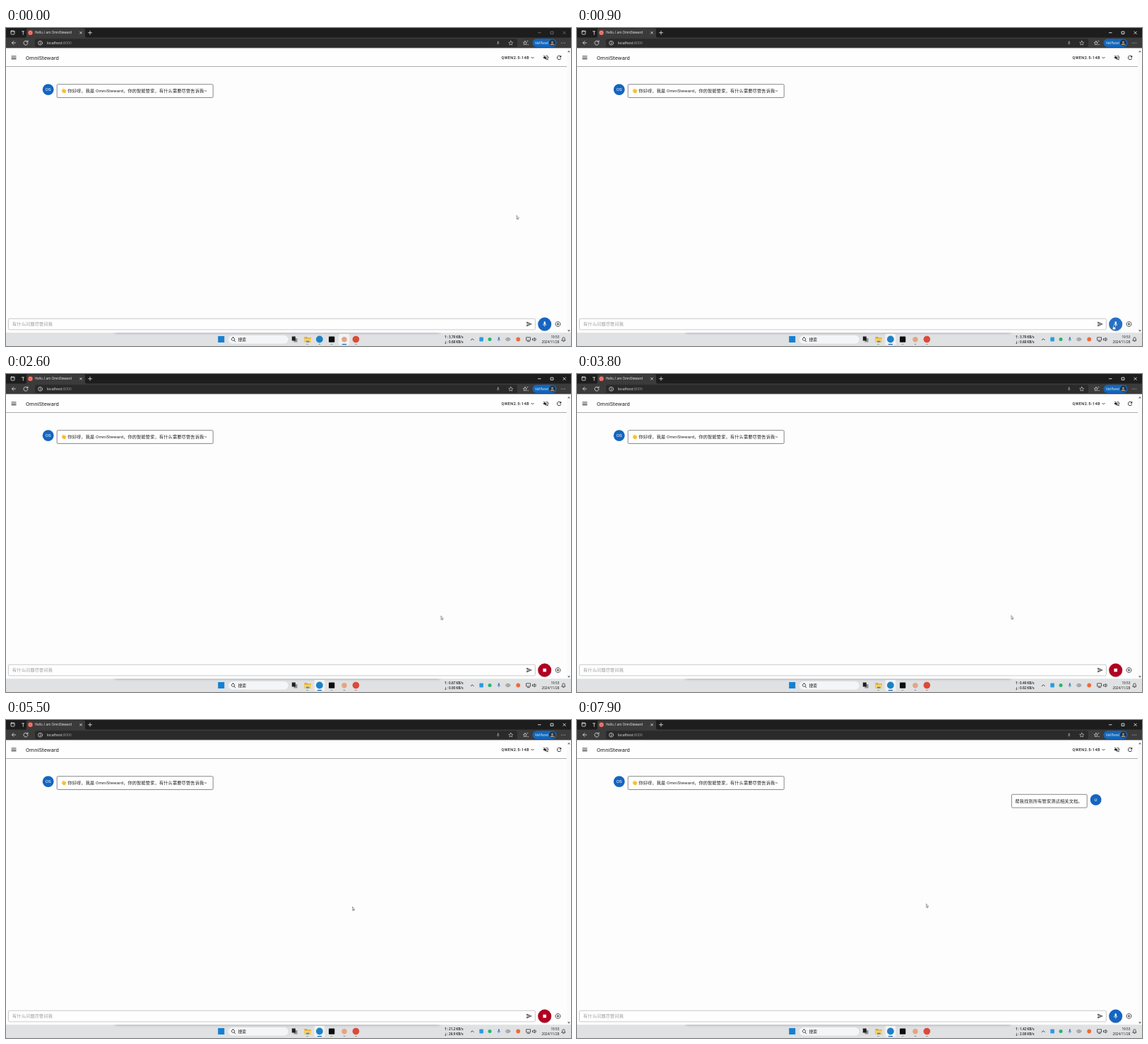
Animation, 800 px wide and 450 px high, one loop 8 s. Source, as an HTML page:

```html
<!DOCTYPE html>
<html lang="zh">
<head>
<meta charset="utf-8">
<title>OmniSteward</title>
<style>
html, body { margin: 0; width: 100%; height: 100%; overflow: hidden; background: #fdfdfd; }
svg { display: block; }
#stage { width: 100vw; height: 100vh; }
text { white-space: pre; }
.chrome { font-family: "Open Sans", "Noto Sans", sans-serif; fill: #f2f2f2; }
.app { font-family: Roboto, "Noto Sans CJK SC", "Noto Sans CJK", sans-serif; fill: #1c1c1c; }
.chat { font-size: 6.16px; letter-spacing: .19px; }
.sys { font-family: "Open Sans", "Noto Sans CJK SC", "Noto Sans CJK", sans-serif; fill: #161616; font-size: 4.7px; }
.line { fill: none; stroke: currentColor; stroke-width: .8; stroke-linecap: round; stroke-linejoin: round; }
.bubble { fill: #fefefe; stroke: #6c6c6c; stroke-width: .8; }
.mid { text-anchor: middle; }

/* one 8 s clock for everything */
.idle, .live, .net, .reply, .face, .wait, .mic, .stop, .cursor, .arrow, .hand {
  animation: 8s step-end infinite;
}
.idle { animation-name: idle; }
.live { animation-name: live; }
.net { animation-name: net; }
.reply { animation-name: reply; }
.mic { animation-name: mic; }
.stop { animation-name: stop; }
.arrow { animation-name: arrow; }
.hand { animation-name: hand; }
.face { animation-name: face; animation-timing-function: linear; }
.wait { animation-name: wait; animation-timing-function: linear; }
.cursor { animation-name: move; animation-timing-function: linear; }

@keyframes idle { 0% { visibility: visible } 10%, 100% { visibility: hidden } }
@keyframes live { 0% { visibility: hidden } 10%, 100% { visibility: visible } }
@keyframes reply { 0% { visibility: hidden } 98.2%, 100% { visibility: visible } }
@keyframes mic {
  0% { visibility: visible } 22.5% { visibility: hidden } 81.25%, 100% { visibility: visible }
}
@keyframes stop {
  0% { visibility: hidden } 22.5% { visibility: visible } 81.25%, 100% { visibility: hidden }
}
@keyframes arrow {
  0% { visibility: visible } 9% { visibility: hidden } 26.2%, 100% { visibility: visible }
}
@keyframes hand {
  0% { visibility: hidden } 9% { visibility: visible } 26.2%, 100% { visibility: hidden }
}
@keyframes face {
  0%, 8.75% { fill: #1565c0 }
  10%, 22% { fill: #2470c6 }
  23.2%, 24.2% { fill: #7898b8 }
  27%, 84% { fill: #b00020 }
  88.75%, 100% { fill: #1565c0 }
}
@keyframes wait {
  0%, 22% { opacity: 0 }
  23.2%, 24.2% { opacity: 1 }
  27%, 100% { opacity: 0 }
}
@keyframes net {
  0% { transform: translateY(0) }
  12.5% { transform: translateY(-20px) }
  37.5% { transform: translateY(-40px) }
  68% { transform: translateY(-60px) }
  82% { transform: translateY(-80px) }
  98.2%, 100% { transform: translateY(-100px) }
}
@keyframes move {
  0%, 1.25% { transform: translate(722.5px, 265px); animation-timing-function: ease-in-out }
  10%, 25% { transform: translate(758.8px, 420px); animation-timing-function: ease-in-out }
  33%, 58% { transform: translate(614.4px, 341.5px); animation-timing-function: ease-in-out }
  67.5%, 69% { transform: translate(490px, 264px) }
  71.25%, 73% { transform: translate(493.4px, 260.2px) }
  76.25%, 100% { transform: translate(494px, 259.8px) }
}
</style>
</head>
<body>
<svg id="stage" viewBox="0 0 800 450" preserveAspectRatio="none" xmlns="http://www.w3.org/2000/svg">
<defs>
  <symbol id="i-menu" viewBox="0 0 24 24"><path d="M3 18h18v-2H3zm0-5h18v-2H3zm0-7v2h18V6z"/></symbol>
  <symbol id="i-mic" viewBox="0 0 24 24"><path d="M12 14a3 3 0 0 0 3-3V5a3 3 0 0 0-6 0v6a3 3 0 0 0 3 3zm5.3-3a5.3 5.3 0 0 1-10.6 0H5a7 7 0 0 0 6 6.7V21h2v-3.3a7 7 0 0 0 6-6.7z"/></symbol>
  <symbol id="i-send" viewBox="0 0 24 24"><path d="M2 21 23 12 2 3v7l15 2-15 2z"/></symbol>
  <symbol id="i-reload" viewBox="0 0 24 24"><path d="M17.65 6.35A8 8 0 1 0 19.73 14h-2.08A6 6 0 1 1 12 6c1.66 0 3.14.69 4.22 1.78L13 11h7V4z"/></symbol>
  <symbol id="i-mute" viewBox="0 0 24 24"><path d="M16.5 12A4.5 4.5 0 0 0 14 8v2.2l2.45 2.45zM19 12c0 .94-.2 1.82-.54 2.64l1.51 1.51A9 9 0 0 0 14 3.23v2.06A7 7 0 0 1 19 12zM4.27 3 3 4.27 7.73 9H3v6h4l5 5v-6.73l4.25 4.25A7 7 0 0 1 14 18.7v2.06a9 9 0 0 0 3.69-1.81L19.73 21 21 19.73zM12 4 9.9 6.1 12 8.2z"/></symbol>
  <symbol id="i-plus" viewBox="0 0 24 24"><path fill="none" stroke="currentColor" stroke-width="2" d="M12 7v10M7 12h10M12 3a9 9 0 1 0 .01 0z"/></symbol>
  <linearGradient id="shade" x2="0" y2="1"><stop stop-color="#bcbfc2"/><stop offset="1" stop-color="#dfe1e3" stop-opacity="0"/></linearGradient>
  <filter id="soft" x="-5%" y="-50%" width="110%" height="200%"><feGaussianBlur stdDeviation="2 .6"/></filter>
</defs>

<!-- browser -->
<g class="chrome">
  <rect width="800" height="29" fill="#1d1d1d"/>
  <path d="M0 13.5h27q2 0 2-2V2.500q0-2 2-2h79q2 0 2 2v9q0 2 2 2h686V28.600H0z" fill="#3b3b3b"/>
  <g color="#e6e6e6" class="line">
    <rect x="7" y="4" width="5" height="5" rx=".8"/>
    <path d="M7 5h5M22.500 4.800h3M24.300 4.800v4.500"/>
    <path d="M104.600 5.300l2.800 2.800m0-2.800-2.800 2.800M116.500 6.700h5M119 4.200v5"/>
    <path d="M13.500 21H8.500m2.300-2.400L8.400 21l2.400 2.400"/>
    <path d="M30.600 19.600a3 3 0 1 0 .4 1.800M31 17.800v2h-2"/>
  </g>
  <circle cx="34.500" cy="6.700" r="3.400" fill="#e05a52"/>
  <circle cx="34.500" cy="6.700" r="1.900" fill="#f3d6d3"/>
  <circle cx="34.500" cy="6.700" r="1.200" fill="#c8322c"/>
  <text x="41" y="8.400" font-size="4.500">Hello, I am OmniSteward</text>
  <rect x="41" y="15.300" width="683" height="11.800" rx="2.500" fill="#2a2a2a"/>
  <g color="#d8d8d8" class="line">
    <circle cx="48.500" cy="21.200" r="2.900"/>
    <path d="M48.500 21v1.500M48.500 19.700v.05"/>
    <path d="M714.800 18.200l.9 1.900 2.100.3-1.500 1.500.3 2.100-1.800-1-1.900 1 .4-2.100-1.600-1.500 2.200-.3z" stroke-width=".6"/>
    <path d="M735 18.500l.8 1.700 1.900.3-1.400 1.300.3 1.900-1.600-.9-1.700.9.300-1.900-1.400-1.300 1.900-.3zM737.800 18.500h1.200M738.500 23.500h1" stroke-width=".7"/>
  </g>
  <use href="#i-mic" x="693.500" y="18" width="6.400" height="6.400" fill="#9a9a9a"/>
  <text x="57.800" y="23" font-size="5.200">localhost<tspan fill="#9c9c9c">:8000</tspan></text>
  <rect x="745.500" y="15.300" width="34" height="11.600" rx="5.800" fill="#1267bd"/>
  <text x="749" y="22.800" font-size="4.500">VeilPanel</text>
  <circle cx="773.500" cy="21.100" r="4.500" fill="#24303c"/>
  <path d="M770.500 24.300q.2-2.600 3-2.600t3 2.600z" fill="#9c8c80"/>
  <circle cx="773.500" cy="20" r="1.600" fill="#9c8c80"/>
  <path d="M786.600 21.200h.1M789 21.200h.1M791.400 21.200h.1" class="line" color="#e6e6e6" stroke-width="1.100"/>
  <g class="line" stroke-width=".6">
    <path class="idle" color="#777" d="M753.500 6.700h3.600M771.500 5h3.400v3.400h-3.400zM788.900 5l3.400 3.400m0-3.400-3.400 3.400"/>
    <path class="live" color="#fff" d="M753.500 6.700h3.600M771.500 5h3.400v3.400h-3.400zM788.900 5l3.400 3.400m0-3.400-3.400 3.400"/>
  </g>
</g>

<!-- page -->
<rect y="28.600" width="800" height="402.600" fill="#fdfdfd"/>
<rect y="28.600" width="794" height="25.600" fill="#fefefe"/>
<rect y="54.100" width="794" height=".8" fill="#989898"/>
<rect x="794" y="28.600" width="6" height="402.600" fill="#fafafa"/>
<path d="M795 34.300l2-2.600 2 2.600zM795 427.300l2 2.600 2-2.600z" fill="#777"/>
<g class="app">
  <use href="#i-menu" x="6.400" y="37.200" width="9.240" height="9.240"/>
  <text x="28" y="44.600" font-size="7.650" letter-spacing=".1">OmniSteward</text>
  <text x="701.500" y="43.900" font-size="5.390" font-weight="500" letter-spacing=".48">QWEN2.5-14B</text>
  <path d="M743.800 41.300l1.700 1.700 1.700-1.700" class="line" color="#1c1c1c"/>
  <use href="#i-mute" x="759.900" y="37.300" width="9.240" height="9.240"/>
  <use href="#i-reload" x="778.500" y="37.300" width="9.240" height="9.240"/>

  <circle cx="59.700" cy="87.200" r="7.900" fill="#1565c0"/>
  <text class="mid" x="59.700" y="89.400" font-size="6.160" fill="#fff" style="fill:#fff">OS</text>
  <rect class="bubble" x="72.200" y="79.700" width="221" height="18.800" rx="1.400"/>
  <path d="M79.500 88.500l2-2.300 1.500 1 .8-.7 1.200 2.300-.5 2.500-2.300 1.200-2.300-1.500z" fill="#f7bd32"/>
  <path d="M79.300 87l1.700 2M81 85.800l1.500 2M78.900 89.200l1.500 1" stroke="#f7bd32" stroke-linecap="round"/>
  <text class="chat" x="87.300" y="91.400">你好呀，我是 OmniSteward，你的智能管家，有什么需要尽管告诉我~</text>

  <g class="reply">
    <rect class="bubble" x="615.400" y="105.300" width="106.800" height="18.800" rx="1.400"/>
    <text class="chat" x="620.500" y="117">帮我找到所有管家测试相关文档。</text>
    <circle cx="734.600" cy="112.900" r="7.900" fill="#1565c0"/>
    <text class="mid" x="734.600" y="115.100" font-size="6.160" style="fill:#fff">U</text>
  </g>

  <rect x="3.400" y="411.300" width="746" height="15.600" rx="1.500" fill="#fefefe" stroke="#b4b4b4" stroke-width=".7"/>
  <text class="chat" x="9" y="421.400" style="fill:#9a9a9a">有什么问题尽管问我</text>
  <use href="#i-send" x="736.300" y="414.400" width="9.240" height="9.240" fill="#666"/>
  <circle cx="762.700" cy="419.700" r="9.600" fill="#000" opacity=".18"/>
  <circle class="face" cx="762.700" cy="419.100" r="9.500" fill="#1565c0"/>
  <circle class="wait" cx="762.700" cy="419.100" r="8.600" fill="none" stroke="#d08a66" stroke-width="1.500" stroke-dasharray="3.500 1"/>
  <use class="mic" href="#i-mic" x="758.100" y="414.500" width="9.240" height="9.240" fill="#fff"/>
  <rect class="stop" x="760.400" y="416.800" width="4.600" height="4.600" fill="#fff"/>
  <use href="#i-plus" x="776.900" y="414.400" width="9.240" height="9.240" color="#1c1c1c"/>
</g>

<!-- taskbar -->
<rect y="431.200" width="800" height="18.800" fill="#dfe1e3"/>
<rect x="154" y="431.200" width="460" height="5" fill="url(#shade)" filter="url(#soft)"/>
<g class="sys">
  <rect x="300.200" y="436" width="9" height="9" fill="#1580d2"/>
  <rect x="314.500" y="434.600" width="85.500" height="12.400" rx="6.200" fill="#f4f5f6" stroke="#d0d2d4" stroke-width=".4"/>
  <path d="M323.100 442.100l1.600 1.800M321.500 438a2.200 2.200 0 1 0 .01 0z" class="line" color="#222"/>
  <text x="328.500" y="443.100" font-size="5.800">搜索</text>
  <rect x="407.500" y="439" width="5" height="5.500" fill="#8d8d8d"/>
  <rect x="404.800" y="436.500" width="5" height="6" fill="#202020"/>
  <path d="M422.500 437h3.500l1 1.200h5v6.500h-9.500z" fill="#e5a52c"/>
  <path d="M422.500 439.500h9.500v5.200h-9.500z" fill="#f8d160"/>
  <rect x="425" y="442.700" width="4.500" height="2" fill="#3a8fd6"/>
  <g class="idle">
    <rect x="471.300" y="433" width="15" height="15.500" rx="1.800" fill="#f1f2f3"/>
    <rect x="475.700" y="447" width="6.500" height="1.200" rx=".6" fill="#1668b8"/>
    <rect x="442.700" y="447" width="2.600" height="1" rx=".5" fill="#858585"/>
  </g>
  <g class="live">
    <rect x="436.400" y="433" width="15" height="15.500" rx="1.800" fill="#f1f2f3"/>
    <rect x="440.700" y="447" width="6.500" height="1.200" rx=".6" fill="#1668b8"/>
    <rect x="477.700" y="447" width="2.600" height="1" rx=".5" fill="#858585"/>
  </g>
  <circle cx="443.900" cy="440.500" r="4.900" fill="#1c82c4"/>
  <rect x="457" y="436.500" width="8.300" height="8.300" rx="1" fill="#0c0c0c"/>
  <circle cx="479" cy="440.700" r="3.700" fill="#e5a482"/>
  <circle cx="495.400" cy="440.500" r="4.800" fill="#dc4a38"/>
  <path d="M425.700 447.500h2M460 447.500h2M494.400 447.500h2" class="line" color="#858585"/>

  <svg x="612" y="431.500" width="44" height="18" viewBox="0 0 44 18" overflow="hidden">
    <g class="net" font-weight="600" font-size="4.600">
      <text x="8" y="7.700">↑: 3.79 KB/s</text><text x="8" y="14.400">↓: 0.68 KB/s</text>
      <text x="8" y="27.700">↑: 0.67 KB/s</text><text x="8" y="34.400">↓: 0.90 KB/s</text>
      <text x="8" y="47.700">↑: 0.49 KB/s</text><text x="8" y="54.400">↓: 0.92 KB/s</text>
      <text x="8" y="67.700">↑: 21.2 KB/s</text><text x="8" y="74.400">↓: 26.9 KB/s</text>
      <text x="8" y="87.700">↑: 4.32 KB/s</text><text x="8" y="94.400">↓: 16.0 KB/s</text>
      <text x="8" y="107.700">↑: 1.42 KB/s</text><text x="8" y="114.400">↓: 2.08 KB/s</text>
    </g>
  </svg>
  <path d="M658.300 441.700l2-2 2 2" class="line" color="#222"/>
  <rect x="670.300" y="437.500" width="5.600" height="6" rx="1" fill="#2d9be0"/>
  <circle cx="685" cy="440.500" r="2.500" fill="#27b56c"/>
  <use href="#i-mic" x="694" y="436.700" width="7.600" height="7.600" fill="#3877bd"/>
  <g class="line" color="#6c6c6c"><ellipse cx="710.700" cy="440.500" rx="3" ry="2"/><circle cx="710.700" cy="440.500" r=".7"/></g>
  <circle cx="725.200" cy="440.500" r="2.900" fill="#ee6a3a"/>
  <g class="line" color="#333" stroke-width=".7">
    <path d="M737 437.800h5.500v4.200H737zM738.300 443.600h3M745.800 439.600h1.300l1.500-1.500v5l-1.500-1.500h-1.300zM750 439.200q1 1.400 0 2.800"/>
    <path d="M787 442.200h5l-.8-1.200v-1.500a1.700 1.700 0 0 0-3.400 0v1.500zM789 443.500h1"/>
  </g>
  <text x="783.400" y="439.400" text-anchor="end">19:53</text>
  <text x="783.400" y="445.600" text-anchor="end" font-size="4.700">2024/11/28</text>
</g>

<!-- pointer -->
<g class="cursor" fill="#fff" stroke="#333" stroke-width=".5" stroke-linejoin="round">
  <path class="arrow" d="M.3.200v5.100l1.100-1 .8 1.700.8-.4-.8-1.600h1.500z"/>
  <path class="hand" d="M0 .500q.6-.7 1.100 0v2.300l2.400.7q.7.300.5 1.200l-.5 2.300H.500L-1.300 4.500q.3-.8 1.300 0z"/>
</g>
</svg>
</body>
</html>
```
